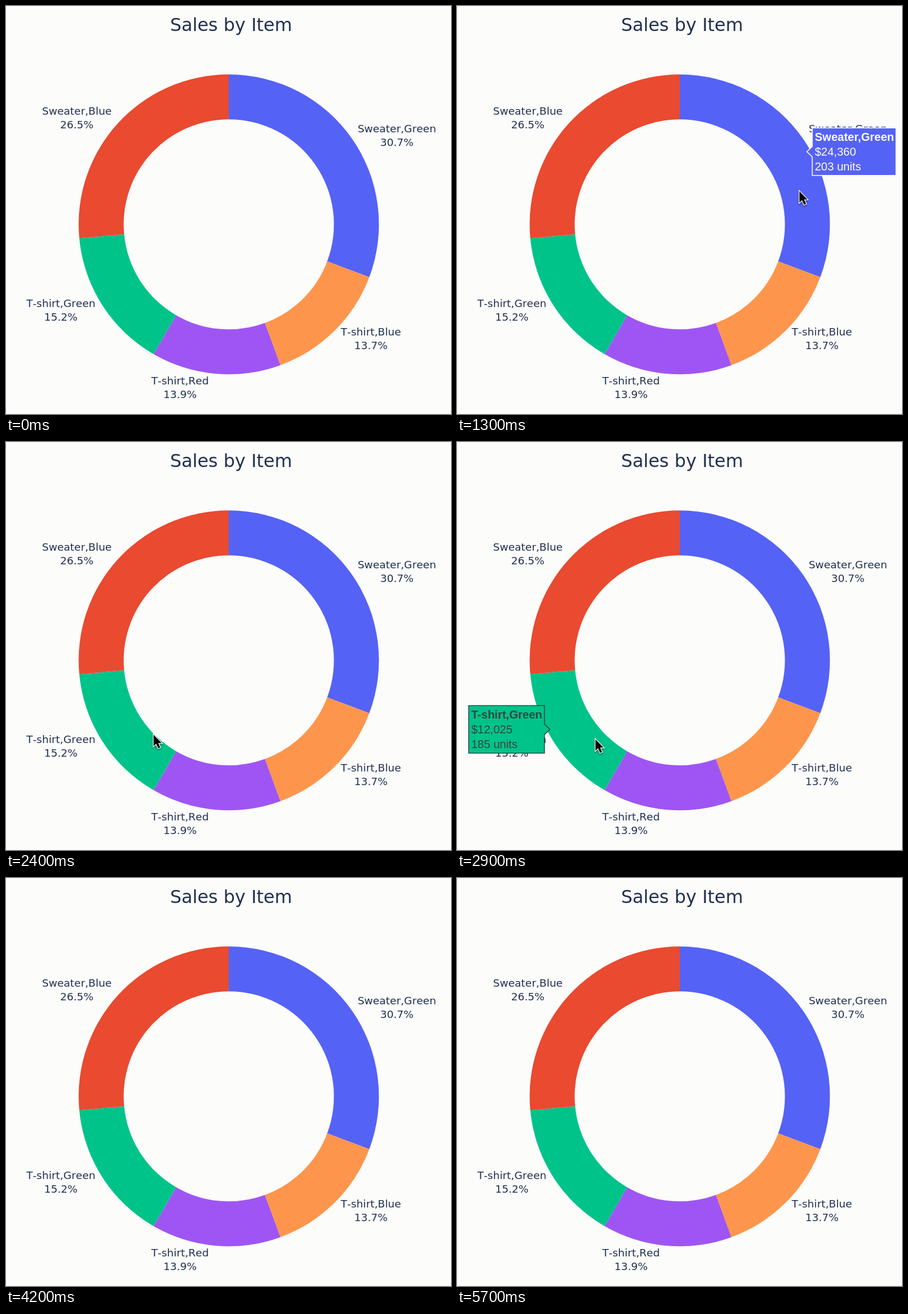
An HTML page for the animation above (5.8 s loop, 781 px wide and 717 px high).

```html
<!DOCTYPE html>
<html lang="en">
<head>
<meta charset="utf-8">
<title>Sales by Item</title>
<style>
  html, body { margin: 0; width: 100%; height: 100%; overflow: hidden; background: #fcfcfb; }
  svg { display: block; width: 781px; height: 717px; }
  .label { font: 18.46px "DejaVu Sans", sans-serif; font-kerning: none; fill: #22304f; text-anchor: middle; }
  .title { font-size: 31.5px; }
  .tip { font: 20px "Liberation Sans", Arial, sans-serif; }
  .bold { font-weight: bold; }
  #cursor { filter: drop-shadow(0 2px 1.5px rgba(0, 0, 0, .4)); }
</style>
</head>
<body>
<svg id="stage" viewBox="0 0 781 717"></svg>
<script>
const LOOP = 5800, STEP = 100;
const CX = 391, CY = 383.75, OUTER = 263.5, INNER = 184.5;
const stage = document.getElementById("stage");

// name, sales, shown share, colour, label centre, first baseline
const slices = [
  ["Sweater,Green", 24360, "30.7%", "#5562f6", 686, 222],
  ["T-shirt,Blue", 10855, "13.7%", "#fd964c", 640.5, 579],
  ["T-shirt,Red", 11050, "13.9%", "#9f55f3", 305.5, 664.5],
  ["T-shirt,Green", 12025, "15.2%", "#00c38a", 96.3, 528.5],
  ["Sweater,Blue", 21000, "26.5%", "#e94a30", 124.3, 191]
];

function add(tag, attrs, parent = stage, text = "") {
  const el = document.createElementNS("http://www.w3.org/2000/svg", tag);
  for (const key in attrs) el.setAttribute(key, attrs[key]);
  el.textContent = text;
  return parent.appendChild(el);
}

function point(radius, turn) {
  const a = turn * 2 * Math.PI;
  return `${CX + radius * Math.sin(a)} ${CY - radius * Math.cos(a)}`;
}

function ring(from, to) {
  return `M${point(OUTER, from)} A${OUTER} ${OUTER} 0 0 1 ${point(OUTER, to)}` +
    `L${point(INNER, to)} A${INNER} ${INNER} 0 0 0 ${point(INNER, from)}Z`;
}

function label(x, y, text, cls = "label") {
  add("text", { x, y, class: cls }, stage, text);
}

function tooltip(path, fill, ink, x, y, lines) {
  const g = add("g", { class: "tip", visibility: "hidden" });
  add("path", { d: path, fill, stroke: ink, "stroke-width": 1.54 }, g);
  lines.forEach((line, i) =>
    add("text", { x, y: y + i * 25.8, fill: ink, class: i ? "" : "bold" }, g, line));
  return g;
}

const total = slices.reduce((sum, s) => sum + s[1], 0);
let turn = 0;
for (const [, value, , fill] of slices) {
  const end = turn + value / total;
  add("path", { d: ring(turn, end), fill });
  turn = end;
}
label(395, 44, "Sales by Item", "label title");
for (const [name, , share, , x, y] of slices) {
  label(x, y, name);
  label(x, y + 24, share);
}

const tips = [
  { from: 600, to: 1900, el: tooltip("M614 256l9.5 -9.2V214.3H770.5V297.7H623.5V265.2Z",
      slices[0][3], "#fff", 628, 237, ["Sweater,Green", "$24,360", "203 units"]) },
  { from: 2500, to: 3800, el: tooltip("M163 505l-9.5 -9.2V463.3H20.5V546.7H153.5V514.2Z",
      slices[3][3], "#38443f", 25, 486, ["T-shirt,Green", "$12,025", "185 units"]) }
];

const cursor = add("path", {
  id: "cursor", d: "M0 1.5V21.5L4.6 17.3L8.2 25.2L11.6 23.7L8.2 16H14Z",
  fill: "#000", stroke: "#fff", "stroke-width": 2.4, "paint-order": "stroke"
});

// time, x, y of the pointer
const track = [
  [100, 800, 385], [300, 735, 367], [500, 658, 343], [600, 622, 330], [700, 604, 325],
  [800, 601, 324], [1700, 601, 324], [1900, 548, 351], [2200, 330, 472],
  [2400, 259, 513], [2600, 245, 520], [2700, 243, 521], [3800, 243, 521]
];

function pointer(t) {
  const i = track.findIndex(k => k[0] > t);
  if (i < 1) return null;
  const [t0, x0, y0] = track[i - 1], [t1, x1, y1] = track[i];
  const p = (t - t0) / (t1 - t0);
  return [x0 + (x1 - x0) * p, y0 + (y1 - y0) * p];
}

const show = (el, on) => el.setAttribute("visibility", on ? "visible" : "hidden");

function draw(now) {
  const t = Math.floor(now % LOOP / STEP) * STEP;
  for (const tip of tips) show(tip.el, t >= tip.from && t < tip.to);
  const pos = pointer(t);
  show(cursor, pos);
  if (pos) cursor.setAttribute("transform", `translate(${pos})`);
}

const start = performance.now();
function tick() {
  draw(performance.now() - start);
  requestAnimationFrame(tick);
}
tick();
</script>
</body>
</html>
```
